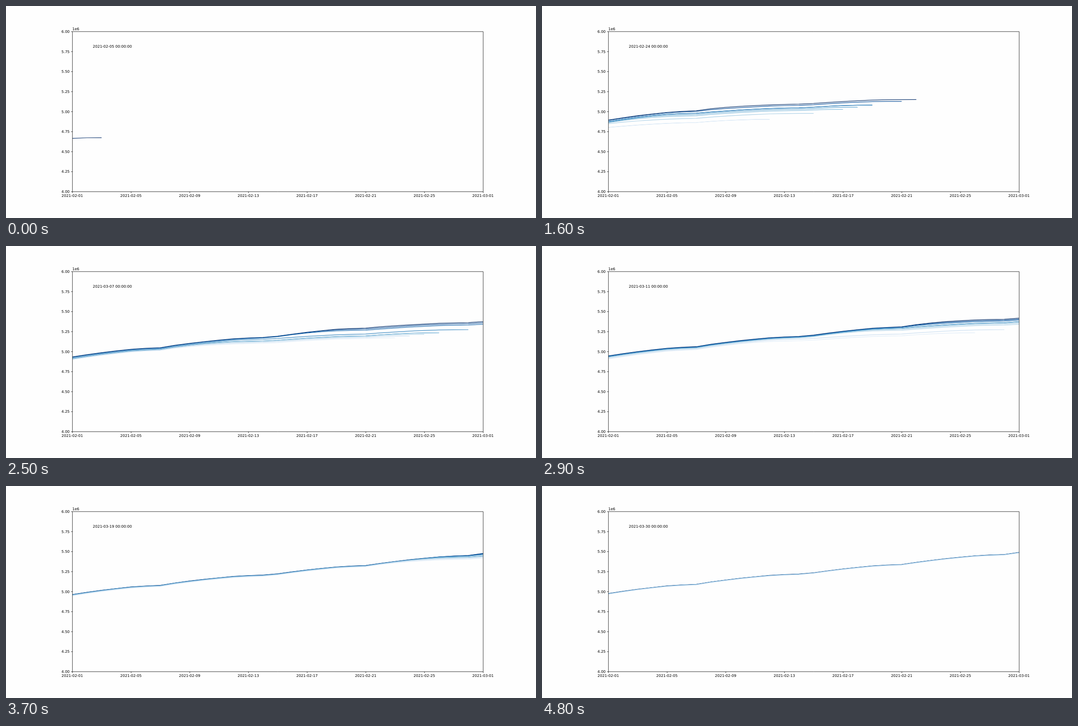
Write an HTML page with a canvas that moves like this. It is 1183 px wide and 473 px high and loops after 4.9 s.

```html
<!DOCTYPE html>
<html lang="en">
<head>
<meta charset="utf-8">
<title>Reported totals by day</title>
<style>
  html, body { margin: 0; width: 100%; height: 100%; overflow: hidden; background: #fefefe; }
  canvas { display: block; }
</style>
</head>
<body>
<canvas id="stage" width="1183" height="473"></canvas>
<script>
const ctx = document.getElementById('stage').getContext('2d');
const W = 1183, H = 473, STEP = 100;
const LEFT = 148.3, RIGHT = 1065.1, TOP = 57.1, BOTTOM = 414.3;
const TRAIL = 9, LAST_DAY = 29, HOLIDAY = 15;

// Days are counted from 2021-02-01 = 1; some days have no report.
const MISSING = [6, 7, 18, 31, 32];
const reports = [];
for (let day = 5; day <= 58; day++) if (!MISSING.includes(day)) reports.push(day);

// Final daily rise in pixels: a weekly rhythm from Sunday, times the pace of each week.
const RHYTHM = [1.3, 4.8, 4.5, 4.1, 3.5, 3.2, 1.9];
const PACE = [1.115, 0.95, 1, 0.95];
// Height of the first point, by report day.
const START = [[5, 295], [14, 270.5], [17, 262.4], [24, 254], [35, 247.1], [42, 243.1], [51, 241], [58, 239.7]];
// Age at which half of the late entries have arrived, by report day.
const SETTLED = [[24, 15.4], [29, 17], [35, 14.1], [42, 15.7]];
const BLUES = ['f7fbff', 'deebf7', 'c6dbef', '9ecae1', '6baed6', '4292c6', '2171b5', '08519c', '08306b']
  .map(hex => [0, 2, 4].map(i => parseInt(hex.slice(i, i + 2), 16)));

const clamp01 = v => Math.max(0, Math.min(1, v));
const dayX = day => LEFT - 0.4 + (RIGHT - LEFT) * (day - 1) / 28;
const isoDate = day => new Date(Date.UTC(2021, 1, day)).toISOString().slice(0, 10);

function lerpKeys(keys, x) {
  let i = 1;
  while (i < keys.length - 1 && x > keys[i][0]) i++;
  const [x0, y0] = keys[i - 1], [x1, y1] = keys[i];
  return y0 + (y1 - y0) * clamp01((x - x0) / (x1 - x0));
}

function blue(v) {
  const p = v * (BLUES.length - 1), i = Math.min(Math.floor(p), BLUES.length - 2);
  const rgb = BLUES[i].map((c, k) => Math.round(c + (BLUES[i + 1][k] - c) * (p - i)));
  return `rgb(${rgb})`;
}

function finalRise(day) {
  const share = day === HOLIDAY ? 0.62 : 1;
  return RHYTHM[day % 7] * PACE[Math.floor((day - 2) / 7)] * share;
}

// Share of a day's rise still unreported at a given age in days.
function pendingShare(age, settled) {
  const late = 0.47 + 0.49 * Math.exp((2 - age) / 1.7);
  return late * clamp01(0.5 + (settled - age) / 3.5);
}

// Mondays repeat Sunday's figures; after a holiday Tuesday does too.
function dataDay(report) {
  return report % 7 === 1 || report - 1 === HOLIDAY ? dataDay(report - 1) : report;
}

function drawCurve(report, age) {
  const source = dataDay(report);
  const settled = lerpKeys(SETTLED, source);
  const end = Math.min(LAST_DAY, source - 2);
  let y = lerpKeys(START, source) + 0.3;
  ctx.beginPath();
  ctx.moveTo(dayX(1), y);
  for (let day = 2; day <= end; day++) {
    y -= finalRise(day) * (1 - pendingShare(source - day, settled));
    ctx.lineTo(dayX(day), y);
  }
  ctx.strokeStyle = blue(1 - age / TRAIL);
  ctx.lineWidth = 1.23;
  ctx.lineJoin = 'round';
  ctx.stroke();
}

function label(text, x, y, align) {
  ctx.textAlign = align;
  ctx.fillText(text, x, y);
}

function drawAxes() {
  ctx.strokeStyle = ctx.fillStyle = '#000';
  ctx.lineWidth = 0.82;
  ctx.beginPath();
  ctx.rect(LEFT, TOP, RIGHT - LEFT, BOTTOM - TOP);
  for (let day = 1; day <= LAST_DAY; day += 4) {
    const x = dayX(day) + 0.4;
    ctx.moveTo(x, BOTTOM);
    ctx.lineTo(x, BOTTOM + 2.9);
    label(isoDate(day), dayX(day), 426.2, 'center');
  }
  for (let i = 0; i <= 8; i++) {
    const y = BOTTOM - (BOTTOM - TOP) * i / 8;
    ctx.moveTo(LEFT, y);
    ctx.lineTo(LEFT - 2.9, y);
    label((4 + i / 4).toFixed(2), 142.1, y + 2.8, 'right');
  }
  ctx.stroke();
  label('1e6', 147.9, 54.2, 'left');
}

function draw(step) {
  ctx.fillStyle = '#fefefe';
  ctx.fillRect(0, 0, W, H);
  ctx.save();
  ctx.beginPath();
  ctx.rect(LEFT, TOP, RIGHT - LEFT, BOTTOM - TOP);
  ctx.clip();
  // Older curves lie on top of newer ones.
  for (let age = 0; age < TRAIL && age <= step; age++) drawCurve(reports[step - age], age);
  ctx.restore();
  drawAxes();
  label(isoDate(reports[step]) + ' 00:00:00', 193.7, 92.7, 'left');
}

function tick() {
  draw(Math.floor(performance.now() / STEP) % reports.length);
  requestAnimationFrame(tick);
}

ctx.font = '8.22px "DejaVu Sans", sans-serif';
ctx.textRendering = 'geometricPrecision';
tick();
</script>
</body>
</html>
```
